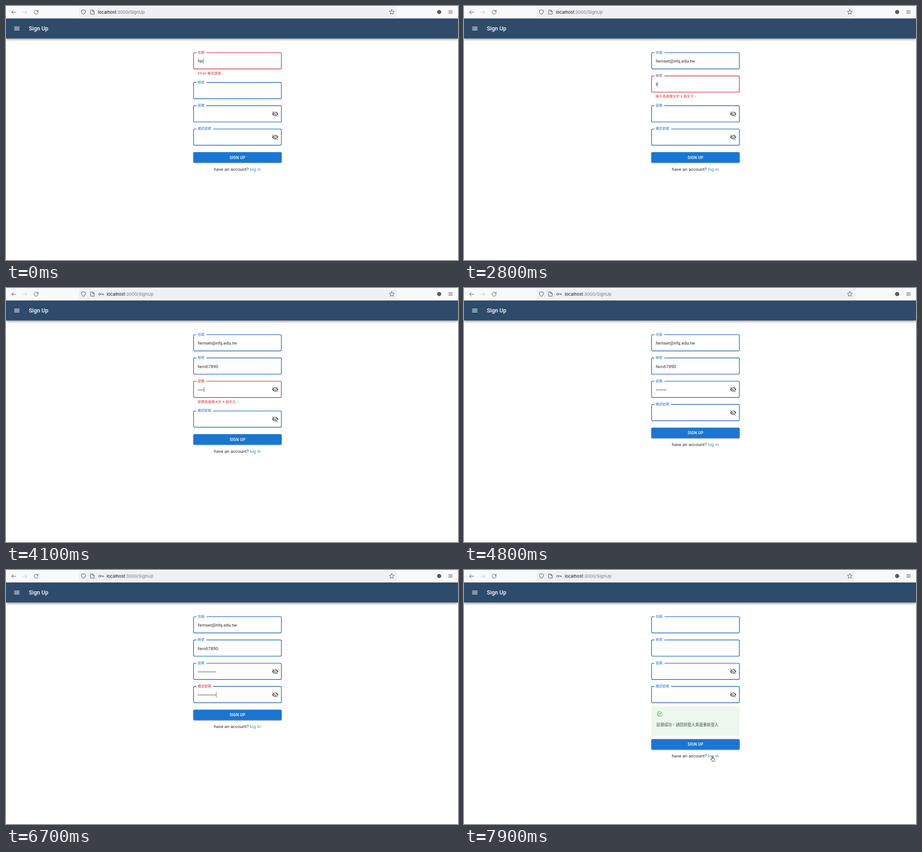
These frames come from a looping animation (998x561 px, 8000 ms). An HTML page with a canvas:

```html
<!DOCTYPE html>
<html lang="zh-Hant">
<head>
<meta charset="utf-8">
<title>Sign Up</title>
<style>
html, body { margin: 0; width: 100%; height: 100%; overflow: hidden; background: #fff; }
canvas { display: block; width: 998px; height: 561px; }
</style>
</head>
<body>
<canvas id="stage"></canvas>
<script>
const W = 998, H = 561, LOOP = 8000, STEP = 100;
const canvas = document.getElementById('stage');
const ctx = canvas.getContext('2d');
const dpr = window.devicePixelRatio || 1;
canvas.width = W * dpr;
canvas.height = H * dpr;

const SANS = 'Roboto, "Noto Sans CJK TC", "Noto Sans CJK", sans-serif';
const UI = 'Inter, sans-serif';
const BLUE = [25, 118, 210], RED = [211, 47, 47];
const SUBMIT = 7200, KEY_ICON = 3800;
const LEFT = 414.2, WIDTH = 193.8, PITCH = 51.4, HELPER = 14.3;

const every = (from, to) => Array.from({ length: (to - from) / STEP + 1 }, (_, i) => from + i * STEP);

// keys: typing times; errors: spans [from, to, label lead-in at the end]
const fields = [
  { label: '信箱', text: 'fernset@nfq.edu.tw', help: 'Email 格式錯誤', focus: 0, notch: 442.5,
    keys: [0, 0, 0, 100, 200, 400, 600, 700, 900, 1000, 1100, ...every(1100, 1500), 1700, 1800],
    errors: [[-1000, 1200, 40], [1500, 1700, 40]] },
  { label: '帳號', text: 'fern67890', help: '帳戶長度需大於 6 個字元。', focus: 2400, notch: 442.5,
    keys: every(2800, 3600), errors: [[2800, 3400, 40]] },
  { label: '密碼', text: '•'.repeat(12), help: '密碼長度需大於 6 個字元。', focus: 3700, notch: 442.5, secret: true,
    keys: [...every(3800, 4400), ...every(4900, 5300)], errors: [[3800, 4400, 40]] },
  { label: '確認密碼', text: '•'.repeat(12), help: '密碼不一致。', focus: 5400, notch: 457.2, secret: true,
    keys: [5400, 5500, ...every(5700, 6000), ...every(6200, 6700)], errors: [[5400, 6700, 0]] }
];

const eyeOff = new Path2D('M12 7c2.76 0 5 2.24 5 5 0 .65-.13 1.26-.36 1.83l2.92 2.92c1.51-1.26 2.7-2.89 3.43-4.75-1.73-4.39-6-7.5-11-7.5-1.4 0-2.74.25-3.98.7l2.16 2.16C10.74 7.13 11.35 7 12 7zM2 4.27l2.28 2.28.46.46C3.08 8.3 1.78 10.02 1 12c1.73 4.39 6 7.5 11 7.5 1.55 0 3.03-.3 4.38-.84l.42.42L19.73 22 21 20.73 3.27 3 2 4.27zM7.53 9.8l1.55 1.55c-.05.21-.08.43-.08.65 0 1.66 1.34 3 3 3 .22 0 .44-.03.65-.08l1.55 1.55c-.67.33-1.41.53-2.2.53-2.76 0-5-2.24-5-5 0-.79.2-1.53.53-2.2zm4.31-.78l3.15 3.15.02-.16c0-1.66-1.34-3-3-3l-.17.01z');
const check = new Path2D('M20 12A8 8 0 1 1 12 4C12.76 4 13.5 4.11 14.2 4.31L15.77 2.74C14.61 2.26 13.34 2 12 2A10 10 0 1 0 22 12M7.91 10.08L6.5 11.5L11 16L21 6L19.59 4.58L11 13.17Z');
const hand = new Path2D('M2.6 7.2V1.6Q2.6.5 3.5.5Q4.4.5 4.4 1.6V5Q5.8 4.3 6.1 5.4Q7.4 4.8 7.7 6Q9 5.7 9 7.1V9.2Q9 10.6 8 11.8H3.6Q2.7 10 .8 8.2Q0 7.2.8 6.7Q1.5 6.4 2.6 7.6Z');

const clamp = x => Math.max(0, Math.min(1, x));
const easeOut = x => 1 - (1 - clamp(x)) ** 2.2;
const easeInOut = x => { x = clamp(x); return x * x * (3 - 2 * x); };
const blend = (a, b, p) => `rgb(${a.map((v, i) => Math.round(v + (b[i] - v) * p))})`;

function text(str, x, y, size, color, { font = SANS, weight = 400, gap = 0, align = 'left' } = {}) {
  ctx.font = `${weight} ${size}px ${font}`;
  ctx.letterSpacing = gap + 'px';
  ctx.textAlign = align;
  ctx.fillStyle = color;
  ctx.fillText(str, x, y);
  return ctx.measureText(str).width;
}

function box(x, y, w, h, r, fill) {
  ctx.beginPath();
  ctx.roundRect(x, y, w, h, r);
  ctx.fillStyle = fill;
  ctx.fill();
}

function shadowed(blur, dy, alpha, draw) {
  ctx.save();
  ctx.shadowColor = `rgba(0,0,0,${alpha})`;
  ctx.shadowBlur = blur * dpr;
  ctx.shadowOffsetY = dy * dpr;
  draw();
  ctx.restore();
}

function line(d, color, width = 1) {
  ctx.strokeStyle = color;
  ctx.lineWidth = width;
  ctx.lineCap = ctx.lineJoin = 'round';
  ctx.stroke(new Path2D(d));
}

function icon(path, x, y, scale, color, outline) {
  ctx.save();
  ctx.translate(x, y);
  ctx.scale(scale, scale);
  ctx.fillStyle = color;
  ctx.fill(path);
  if (outline) {
    ctx.strokeStyle = outline;
    ctx.lineWidth = 0.9;
    ctx.stroke(path);
  }
  ctx.restore();
}

function star(cx, cy, r) {
  let d = '';
  for (let i = 0; i < 10; i++) {
    const a = i * Math.PI / 5 - Math.PI / 2, q = i % 2 ? r * 0.48 : r;
    d += `${i ? 'L' : 'M'}${cx + q * Math.cos(a)} ${cy + q * Math.sin(a)}`;
  }
  line(d + 'Z', '#5b5b66');
}

function appBar() {
  shadowed(5, 2, 0.4, () => {
    ctx.fillStyle = '#2e4b6b';
    ctx.fillRect(0, 27, W, 44.7);
  });
  ctx.fillStyle = '#fff';
  for (const y of [45.9, 49.1, 52.3]) ctx.fillRect(18.2, y, 11.5, 1.3);
  text('Sign Up', 50.4, 54.2, 12.4, '#fff', { weight: 500, gap: 0.05 });
}

function browserBar(t) {
  ctx.fillStyle = '#f9f9fb';
  ctx.fillRect(0, 0, W, 27.5);
  box(160.5, 2.5, 702, 22.5, 3, '#f0f0f4');
  const ink = '#4a4a54';
  line('M12.4 13.8H21.4M16.4 9.8L12.4 13.8L16.4 17.8', ink);
  line('M37.2 13.8H46.2M42.2 9.8L46.2 13.8L42.2 17.8', '#c3c3c9');
  line('M70.6 11.6A4.5 4.5 0 1 0 71 14.6M71 9.2V12.2H68', ink);
  line('M171 8.4L175.4 9.9V12.6Q175.2 16.6 171 18.6Q166.8 16.6 166.6 12.6V9.9Z', ink);
  line('M187.2 9H191.8L194.8 12V18H187.2ZM191.6 9V12.2H194.8', ink);
  let x = 203;
  if (t >= KEY_ICON) {
    line('M204.6 13.7A2.3 2.3 0 1 0 209.2 13.7A2.3 2.3 0 1 0 204.6 13.7M209.2 13.2H215.2V15.4M212.8 13.2V15', ink);
    x = 222.2;
  }
  x += text('localhost', x, 17, 9.5, '#15141a', { font: UI });
  text(':3000/SignUp', x, 17, 9.5, '#77767d', { font: UI });
  star(851.8, 13.6, 5.7);
  box(951.8, 8.7, 9.2, 9.2, 4.6, '#5b5b66');
  line('M977.4 10.2H985.4M977.4 13.2H985.4M977.4 16.2H985.4', ink);
}

function redness(field, t) {
  return field.errors.reduce((sum, [from, to, lead]) =>
    sum + (t < from ? 0 : easeOut((t - from + 40) / 200)) - (t < to ? 0 : easeOut((t - to + lead) / 200)), 0);
}

function drawField(field, top, t, focused) {
  const failing = field.errors.some(([from, to]) => t >= from && t < to);
  ctx.beginPath();
  ctx.roundRect(LEFT, top, WIDTH, 35.9, 2.4);
  ctx.strokeStyle = failing ? '#c23a3b' : '#2266b2';
  ctx.lineWidth = 1.4;
  ctx.stroke();
  ctx.fillStyle = '#fff';
  ctx.fillRect(420.5, top - 2, field.notch - 420.5, 4);
  text(field.label, 423.2, top + 1.8, 7.4, blend(BLUE, RED, redness(field, t)), { gap: 0.07 });

  const typed = t >= SUBMIT ? [] : field.keys.filter(k => k <= t);
  const width = text(field.text.slice(0, typed.length), 423.3, top + 22, 9.8, '#2b2b2b', { gap: 0.06 });
  if (focused) {
    const since = t - (typed.length ? typed[typed.length - 1] : field.focus);
    if (Math.floor((since + 100) / 500) % 2 === 0) {
      ctx.fillStyle = '#333';
      ctx.fillRect(423.4 + width, top + 13, 0.8, 11);
    }
  }
  if (field.secret) icon(eyeOff, 586.6, top + 10.3, 0.643, '#707070');
  if (failing) text(field.help, 423.2, top + 47.6, 7.4, RED_TEXT, { gap: 0.2 });
  return failing;
}
const RED_TEXT = blend(RED, RED, 0);

function drawForm(t) {
  let shift = 0;
  const active = t >= SUBMIT ? null : fields.filter(f => f.focus <= t).pop();
  fields.forEach((field, i) => {
    if (drawField(field, 103.1 + i * PITCH + shift, t, field === active)) shift += HELPER;
  });

  if (t >= SUBMIT) {
    box(413.7, 301, 194.8, 65.2, 2.6, '#edf7ed');
    icon(check, 425.3, 310.5, 0.59, '#4caf50');
    text('註冊成功，請回到登入頁面重新登入', 424.8, 345.1, 8.55, '#2f5431', { gap: 0.03 });
    shift += 65;
  }
  shadowed(2.6, 1.2, 0.4, () => box(413.6, 308.4 + shift, 195, 23.2, 2.6, '#1976d2'));
  text('SIGN UP', 511.1, 323.2 + shift, 8.7, '#fff', { weight: 500, gap: 0.25, align: 'center' });
  const y = 349.4 + shift;
  const width = text('have an account? ', 459.1, y, 9.8, '#2b2b2b', { gap: 0.06 });
  text('log in', 459.1 + width, y, 9.8, '#3689d8', { gap: 0.06 });
}

function drawPointer(t) {
  if (t < 7000) return;
  const p = easeInOut((t - 7300) / 400);
  icon(hand, 528 + 16.8 * p, 319 + 91.6 * p, 1, '#fff', '#222');
}

function render(t) {
  ctx.setTransform(dpr, 0, 0, dpr, 0, 0);
  ctx.fillStyle = '#fff';
  ctx.fillRect(0, 0, W, H);
  appBar();
  browserBar(t);
  drawForm(t);
  drawPointer(t);
}

const start = performance.now();
function tick() {
  const t = (performance.now() - start) % LOOP;
  render(Math.floor(t / STEP) * STEP);
  requestAnimationFrame(tick);
}
tick();
</script>
</body>
</html>
```
